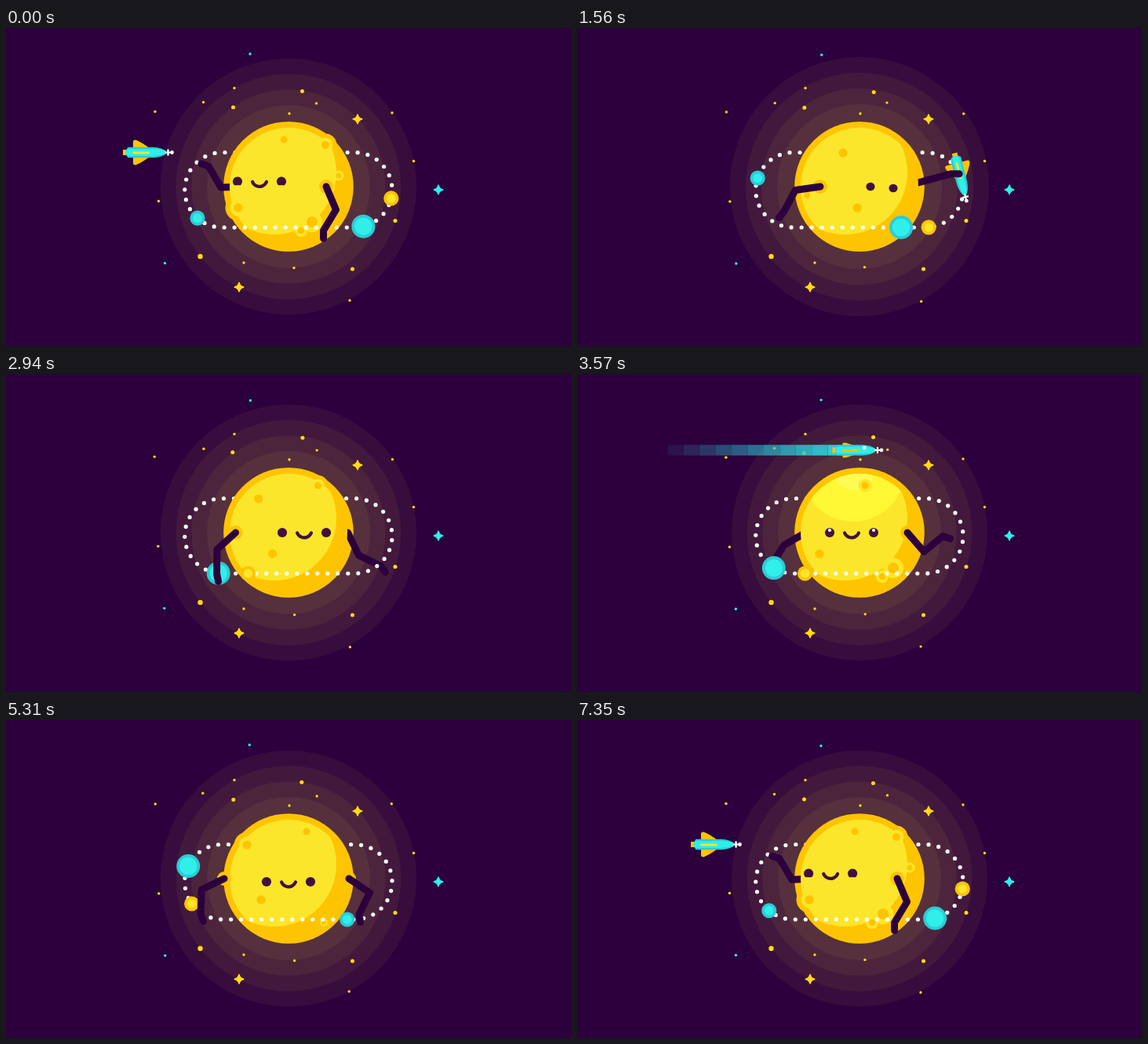
An HTML page with a canvas for the animation above (7.38 s loop, 720x405 px).

```html
<!DOCTYPE html>
<html lang="en">
<head>
<meta charset="utf-8">
<title>Sun and rocket</title>
<style>
html, body { margin: 0; width: 100%; height: 100%; overflow: hidden; background: #2b003d; }
canvas { display: block; width: 720px; height: 405px; }
</style>
</head>
<body>
<canvas id="stage" width="720" height="405"></canvas>
<script>
const ctx = document.getElementById('stage').getContext('2d');
const LOOP = 7380, TAU = Math.PI * 2, DEG = Math.PI / 180;
const BG = '#2b003d', ORANGE = '#ffc400', YELLOW = '#fce62b', GOLD = '#ffdc0f';
const CYAN = '#2fefe8', TEAL = '#2ccbd6', FACE = '#42103c', WHITE = '#fff';
const SUN = { x: 360, y: 202, r: 82.8 };
const TURN = 320;

// Eased step from 0 to 1 between times a and b
function ramp(t, a, b) {
  const u = Math.min(1, Math.max(0, (t - a) / (b - a)));
  return u * u * (3 - 2 * u);
}
const bump = (t, a, b, c, d) => ramp(t, a, b) * (1 - ramp(t, c, d));

// The story beats: wait, grab, throw, greet, rest, look round
const BEATS = [0, 1560, 2310, 3570, 5310, 6480, LOOP];

// Smooth monotone curve with one value per beat; each loop adds the gain
function track(values, gain = 0) {
  const v = [...values, values[0] + gain], n = values.length;
  const rate = i => (v[i + 1] - v[i]) / (BEATS[i + 1] - BEATS[i]);
  const slope = i => {
    const a = rate((i + n - 1) % n), b = rate(i % n);
    return a * b <= 0 ? 0 : 2 * a * b / (a + b);
  };
  return t => {
    let i = 0;
    while (i < n - 1 && BEATS[i + 1] < t) i++;
    const h = BEATS[i + 1] - BEATS[i], u = (t - BEATS[i]) / h, w = 1 - u;
    return v[i] * w * w * (1 + 2 * u) + v[i + 1] * u * u * (3 - 2 * u)
      + h * u * w * (slope(i) * w - slope(i + 1) * u);
  };
}

// Orbit: a stadium, measured clockwise from the start of its top edge
const LX = 275.5, RX = 444.3, CY = 206.25, R = 47.75;
const EDGE = RX - LX, ARC = Math.PI * R, RING = 2 * (EDGE + ARC);
const DOTS = 49;
function onOrbit(s) {
  s = ((s % RING) + RING) % RING;
  if (s < EDGE) return [LX + s, CY - R];
  s -= EDGE;
  if (s < ARC) return [RX + R * Math.sin(s / R), CY - R * Math.cos(s / R)];
  s -= ARC;
  if (s < EDGE) return [RX - s, CY + R];
  s -= EDGE;
  return [LX - R * Math.sin(s / R), CY + R * Math.cos(s / R)];
}
// Rocket path: in along the top, round the right end, out along the bottom
function onSling(s) {
  if (s < 0) return [LX + s, CY - R];
  if (s > EDGE + ARC) return [RX - (s - EDGE - ARC), CY + R];
  return onOrbit(s);
}
const onPass = x => [x, 97];

// Brakes on arrival, is drawn in by the sun, then thrown
function sling(t) {
  const pull = Math.max(0, t), thrown = Math.max(0, t - BEATS[1]);
  return -98 + .13 * t + 4.9e-5 * pull ** 2 + 5.6e-4 * thrown ** 2 - 15 * Math.exp(-(t + 600) / 80);
}
// Flies by, slowest above the sun
function pass(t) {
  const u = t - BEATS[3];
  return 354 + .2 * u + 3.7e-6 * u ** 3;
}

const spin = track([0, 61, -204, -307, -291, -302], -TURN);
const lookX = track([0, 4.5, 12, 14, 8, 34]);
const lookY = track([195.5, 203, 202, 202, 206, 205]);
const dotShift = track([0, 5, 9, 13.5, 17.5, 29], 3 * RING / DOTS);
const strain = t => bump(t, 1350, 1500, 1800, 2500);
const burst = t => 1.05 * bump(t, 1570, 2220, 2220, 2950);
const pulse = t => 2 * bump(t, 900, 1560, 1560, 2000) - 2.8 * burst(t);

const planets = [
  { r: 15, rim: TEAL, core: CYAN, inner: 11.2, s: track([307.6, 350, 464, 513.6, 583.5, 920.5], RING) },
  { r: 9.6, rim: TEAL, core: CYAN, inner: 6, s: track([522, 578, 622, 722, 966, 1133], RING) },
  { r: 9.6, rim: ORANGE, core: YELLOW, inner: 5.8, s: track([254.6, 315, 430, 472.6, 533, 755], RING) }
];

// Each arm: shoulder place on the surface and the angles of its three bones
const BONES = [32, 31, 10];
const arms = [
  { base: 408, bend: [[67, -15, 76, 49, 34, 64], [121, -15, 90, -39, 116, 121], [90, 0, 90, 18, 80, 90]] },
  { base: 249, bend: [[178, 172, 127, 150, 154, 98], [240, 118, 59, 122, 92, 68], [200, 129, 37, 120, 70, 84]] }
];
arms.forEach(a => { a.bend = a.bend.map(b => track(b)); });

const FAR = .025, NEAR = .12;
const stars = [
  { depth: FAR, r: 1.7, color: GOLD, at: [[291, 76.5], [361, 109], [519.5, 169.5], [303, 299]] },
  { depth: FAR, r: 2.5, color: GOLD, at: [[496, 245.5], [441.5, 307]] },
  { depth: FAR, r: 3.2, color: GOLD, at: [[247.5, 291]] },
  { depth: NEAR, r: 1.7, color: GOLD, at: [[251.5, 94.5], [190, 106.5], [395.5, 96], [492, 108], [194.5, 220.5], [367, 305.5], [438, 347]] },
  { depth: NEAR, r: 2.5, color: GOLD, at: [[377.5, 80.5], [289.5, 101]] },
  { depth: NEAR * .5, r: 1.7, color: CYAN, at: [[311, 33], [202.5, 299.5]] }
];
const sparkles = [[448, 116, GOLD], [297, 330, GOLD], [551, 206, CYAN]];

const craters = [[354, 142, 4.5], [407, 149, 5], [296, 229, 5.7], [390, 247, 7], [376, 258, 4.3], [424, 188, 3.5],
  [278, 159, 5.6], [232, 213, 4], [501, 171, 4], [516, 178, 4]];

const wrapX = (x, low) => low + (((x - low) % TURN) + TURN) % TURN;

function disc(x, y, r, color) {
  ctx.fillStyle = color;
  ctx.beginPath();
  ctx.arc(x, y, r, 0, TAU);
  ctx.fill();
}
function clipDisc(x, y, r) {
  ctx.beginPath();
  ctx.arc(x, y, r, 0, TAU);
  ctx.clip();
}
function line(points, width, color, cap = 'round') {
  ctx.lineWidth = width;
  ctx.strokeStyle = color;
  ctx.lineCap = cap;
  ctx.lineJoin = 'round';
  ctx.beginPath();
  points.forEach(p => ctx.lineTo(p[0], p[1]));
  ctx.stroke();
}

function sparkle(x, y, color) {
  const reach = 5.5, waist = 1.4;
  ctx.beginPath();
  ctx.moveTo(x, y - reach);
  for (let i = 1; i <= 4; i++) {
    const a = i * TAU / 4, m = a - TAU / 8;
    ctx.quadraticCurveTo(x + waist * Math.sin(m), y - waist * Math.cos(m), x + reach * Math.sin(a), y - reach * Math.cos(a));
  }
  ctx.closePath();
  ctx.fillStyle = ctx.strokeStyle = color;
  ctx.lineWidth = 1.8;
  ctx.lineJoin = 'round';
  ctx.fill();
  ctx.stroke();
}

function drawSky(t) {
  const g = pulse(t), b = burst(t);
  for (let i = 0; i < 4; i++) disc(SUN.x, SUN.y, 163.2 - i * 19.8 + g * (1 - i * .12), 'rgba(255,228,60,.055)');
  const pushed = (x, y, depth) => [x + (x - SUN.x) * depth * b, y + (y - SUN.y) * depth * b];
  stars.forEach(({ depth, r, color, at }) => at.forEach(([x, y], i) => {
    const [px, py] = pushed(x, y, depth);
    const sway = depth > FAR ? 1.2 * Math.sin(TAU * (1 + i % 3) * t / LOOP) : 0;
    disc(px + sway * .6, py + sway, r, color);
  }));
  sparkles.forEach(([x, y, color]) => sparkle(...pushed(x, y, FAR * .4), color));
}

function drawOrbit(t, front) {
  for (let i = 0; i < DOTS; i++) {
    const [x, y] = onOrbit(3.5 + dotShift(t) + i * RING / DOTS);
    if (y > CY === front) disc(x, y, 2.6, WHITE);
  }
}
function drawPlanets(t, front, list) {
  list.forEach(p => {
    const [x, y] = onOrbit(p.s(t));
    if (y > CY !== front) return;
    disc(x, y, p.r, p.rim);
    disc(x, y, p.inner, p.core);
  });
}

function litClip() {
  clipDisc(SUN.x, SUN.y, 75);
  clipDisc(341.7, 183.7, 79.3);
}

const passing = t => t > 3100 && t < 4300;

function drawFace(t) {
  const x = wrapX(323 + spin(t) + lookX(t), 200), y = lookY(t), s = strain(t);
  const gap = 28 - 13.5 * s, smile = 1 - s;
  const lid = 90 - 38 * (1 - bump(t, 900, 1300, 6700, 7100));
  [-1, 1].forEach(side => {
    ctx.fillStyle = FACE;
    ctx.beginPath();
    ctx.ellipse(x + side * gap, y + side * s, 6.1 - s * .5, 6.1 - s * .9, 0, Math.PI - lid * DEG, TAU + lid * DEG);
    ctx.fill();
    if (passing(t)) disc(x + side * gap, y - 3, 2.1, WHITE);
  });
  if (smile > .05) {
    ctx.strokeStyle = FACE;
    ctx.lineWidth = 4.2 * smile;
    ctx.lineCap = 'round';
    ctx.beginPath();
    ctx.arc(x, y - 3.3, 9.7, .4, Math.PI - .4);
    ctx.stroke();
  }
}

function drawSun(t) {
  // Craters sink away close to the rim
  const spots = craters.map(([base, y, r]) => {
    const x = wrapX(base + spin(t), 200), d = Math.hypot(x - SUN.x, y - SUN.y);
    return { x, y, r: r * (1 - ramp(d, 71, 73)) };
  });
  disc(SUN.x, SUN.y, SUN.r, ORANGE);
  spots.forEach(p => disc(p.x, p.y, p.r * 2.9, ORANGE));
  ctx.save();
  litClip();
  ctx.fillStyle = YELLOW;
  ctx.fillRect(270, 110, 180, 180);
  if (passing(t)) {
    const x = pass(t) - 2;
    disc(x, 122, 66, '#fff834');
    disc(x, 121, 27, '#fffb55');
  }
  ctx.restore();
  spots.forEach(p => {
    disc(p.x, p.y, p.r * 1.85, YELLOW);
    disc(p.x, p.y, p.r, ORANGE);
  });
  ctx.save();
  litClip();
  drawFace(t);
  ctx.restore();
}

function drawArms(t, front) {
  const left = 276, right = 444;
  arms.forEach(({ base, bend }) => {
    let x = wrapX(base + spin(t), left), y = SUN.y;
    if (x < right !== front) return;
    if (!front) x = right - (x - right) * (right - left) / (left + TURN - right);
    const points = [[x, y]];
    ctx.save();
    if (front) disc(x, y, 9, ORANGE);
    else {
      ctx.beginPath();
      ctx.rect(0, 0, 720, 405);
      ctx.arc(SUN.x, SUN.y, 75, 0, TAU);
      ctx.clip('evenodd');
    }
    BONES.forEach((length, i) => {
      const a = bend[i](t) * DEG;
      x += length * Math.cos(a);
      y += length * Math.sin(a);
      points.push([x, y]);
    });
    line(points, 9, BG);
    ctx.restore();
  });
}

function drawTrail(path, s, count, strength) {
  const block = 20.4;
  for (let i = 0; i < count; i++) {
    const points = [];
    for (let j = 0; j <= 5; j++) points.push(path(s - 14 - (i + j / 5) * block));
    ctx.globalAlpha = strength * (1 - i / count);
    line(points, 13.5, TEAL, 'butt');
  }
  ctx.globalAlpha = 1;
}

function hull(h) {
  ctx.beginPath();
  ctx.moveTo(-22, -h);
  ctx.lineTo(10, -h);
  ctx.quadraticCurveTo(21, -h * .9, 26, -2);
  ctx.quadraticCurveTo(27, 0, 26, 2);
  ctx.quadraticCurveTo(21, h * .9, 10, h);
  ctx.lineTo(-22, h);
  ctx.quadraticCurveTo(-28, 0, -22, -h);
  ctx.fill();
}

function drawRocket(path, s, roll) {
  const [x, y] = path(s), a = path(s + 6), b = path(s + 10);
  ctx.save();
  ctx.translate(x, y);
  ctx.rotate(Math.atan2(b[1] - a[1], b[0] - a[0]));
  ctx.fillStyle = ORANGE;
  ctx.fillRect(-28.5, -3.5, 8, 7);
  [-1, 1].forEach(side => {
    ctx.save();
    ctx.scale(1, side * roll);
    ctx.beginPath();
    ctx.moveTo(-15.5, 3);
    ctx.lineTo(-15.5, 14);
    ctx.quadraticCurveTo(-15, 17, -11, 15.5);
    ctx.quadraticCurveTo(-3, 12, 6, 5);
    ctx.fill();
    ctx.restore();
  });
  ctx.fillStyle = TEAL;
  hull(6.8);
  ctx.fillStyle = CYAN;
  hull(4.4);
  line([[-15, .3], [4, .3]], 2.8, roll < 1 ? ORANGE : YELLOW);
  if (roll < 1) disc(12, -3, 2.4, WHITE);
  line([[26, 0], [34, 0]], 2, WHITE);
  line([[29, -3], [29, 3]], 2.4, WHITE);
  disc(34, 0, 2.4, WHITE);
  ctx.restore();
}

function drawFlight(path, s, blocks, strength, roll) {
  ctx.save();
  ctx.beginPath();
  ctx.rect(33, 0, 654, 405);
  ctx.clip();
  if (strength > 0) drawTrail(path, s, blocks, strength);
  drawRocket(path, s, roll);
  ctx.restore();
}
function drawSling(t, front) {
  const u = t > 5000 ? t - LOOP : t;
  if (u < -900 || u > 3000) return;
  const s = sling(u);
  if (s > EDGE + ARC * .6 === front) drawFlight(onSling, s, 16, ramp(u, 1620, 1900), 1);
}

function draw(t) {
  ctx.fillStyle = BG;
  ctx.fillRect(0, 0, 720, 405);
  drawSky(t);
  drawOrbit(t, false);
  drawPlanets(t, false, planets);
  drawSling(t, false);
  drawSun(t);
  drawArms(t, false);
  drawOrbit(t, true);
  drawPlanets(t, true, planets.slice(1));
  drawSling(t, true);
  drawPlanets(t, true, planets.slice(0, 1));
  drawArms(t, true);
  if (passing(t)) drawFlight(onPass, pass(t), 11, 1, .6);
}

let start = null;
function tick(now) {
  if (start === null) start = now;
  draw((now - start) % LOOP);
  requestAnimationFrame(tick);
}
draw(0);
requestAnimationFrame(tick);
</script>
</body>
</html>
```
